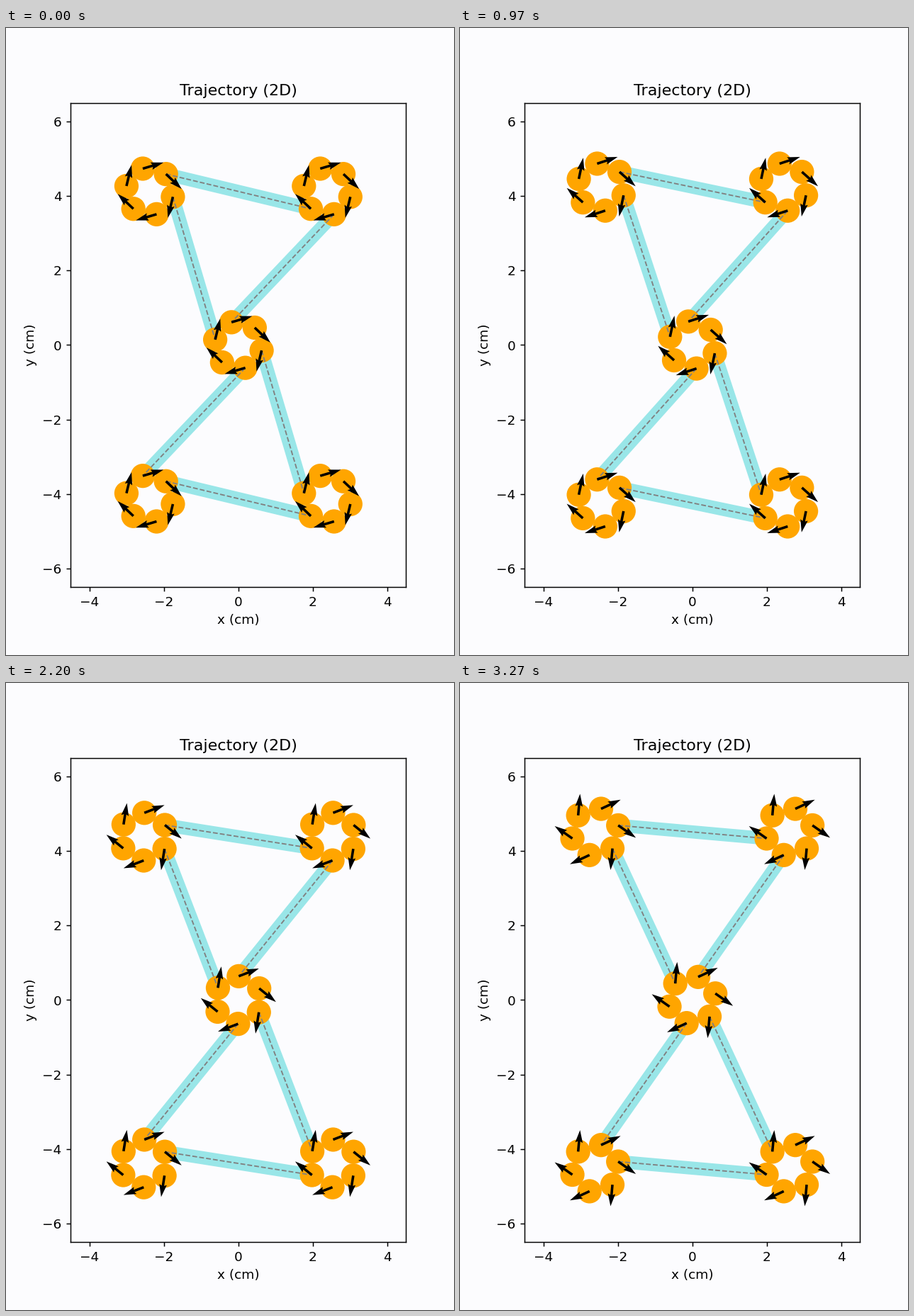
Recreate the animation shown at these times as a matplotlib script. Size 632 by 885 pixels, loop 3.3 s.

```python
import numpy as np
import matplotlib.pyplot as plt
from matplotlib.animation import FuncAnimation
from matplotlib.collections import EllipseCollection, LineCollection

W, H, DPI = 632, 885, 400 / 3
FRAMES, LOOP_MS = 99, 3300
PX_PER_CM = 52.54
ORIGIN = (327.85, 447.5)    # pixel place of (0, 0), from the top left
BACK = "#fcfcfe"

RING_R = 0.64       # ring centre to disc centre
DISC_R = 0.326
ROD = 4.0           # rigid rod length
ARROW = 0.58
SPACING = (4.765, 5.215)

# Unit positions of the five rings: two equilateral triangles sharing a corner
S = np.sqrt(3) / 2
RINGS = np.array([(-0.5, S), (0.5, S), (0, 0), (-0.5, -S), (0.5, -S)])
LINKS = [(0, 1), (0, 2), (1, 2), (2, 4), (2, 3), (3, 4)]
STEPS = np.arange(6) * np.pi / 3


def unit(angle):
    return np.stack([np.cos(angle), np.sin(angle)], axis=-1)


def pose(frame):
    """Disc centres, arrow vectors and rod segments of the linkage."""
    first, last = SPACING
    d = first + (last - first) * frame / (FRAMES - 1)
    arm = 2 * RING_R
    turn = np.arccos((d**2 + arm**2 - ROD**2) / (2 * arm * d))
    tilt = np.arcsin(arm * np.sin(turn) / ROD)

    centres = RINGS * d
    discs = (centres[:, None] + RING_R * unit(turn + STEPS)).reshape(-1, 2)
    arrows = np.tile(ARROW * unit(STEPS - np.pi / 6 - tilt), (len(RINGS), 1))

    rods = []
    for a, b in LINKS:
        dx, dy = RINGS[b] - RINGS[a]
        offset = RING_R * unit(np.arctan2(dy, dx) + turn)
        rods.append([centres[a] + offset, centres[b] - offset])
    return discs, arrows, rods


# The small margin keeps the pixel size from rounding down
fig = plt.figure(figsize=((W + 0.01) / DPI, (H + 0.01) / DPI), dpi=DPI,
                 facecolor=BACK)
aw, ah = 9 * PX_PER_CM, 13 * PX_PER_CM
ax = fig.add_axes([(ORIGIN[0] - aw / 2) / W, (H - ORIGIN[1] - ah / 2) / H,
                   aw / W, ah / H], facecolor=BACK)
ax.set_title("Trajectory (2D)")
ax.set_xlabel("x (cm)")
ax.set_ylabel("y (cm)")

discs, arrows, rods = pose(0)
bands = LineCollection(rods, colors="#99e6e8", linewidths=10, zorder=1)
dots = EllipseCollection(2 * DISC_R, 2 * DISC_R, 0, units="xy", offsets=discs,
                         offset_transform=ax.transData, facecolors="orange",
                         edgecolors="none", zorder=2)
dashes = LineCollection(rods, colors="gray", linewidths=1,
                        linestyles="dashed", zorder=3)
for item in (bands, dots, dashes):
    ax.add_collection(item, autolim=False)
quiver = ax.quiver(*discs.T, *arrows.T, color="black", angles="uv",
                   scale_units="xy", scale=1, units="xy", width=0.0675,
                   zorder=4)

ax.set(xlim=(-4.5, 4.5), ylim=(-6.5, 6.5),
       xticks=range(-4, 5, 2), yticks=range(-6, 7, 2))


def update(frame):
    discs, arrows, rods = pose(frame)
    bands.set_segments(rods)
    dashes.set_segments(rods)
    dots.set_offsets(discs)
    quiver.set_offsets(discs)
    quiver.set_UVC(*arrows.T)
    return bands, dots, dashes, quiver


anim = FuncAnimation(fig, update, frames=FRAMES, interval=LOOP_MS / FRAMES,
                     repeat=True, repeat_delay=0, blit=False)
plt.show()
```
